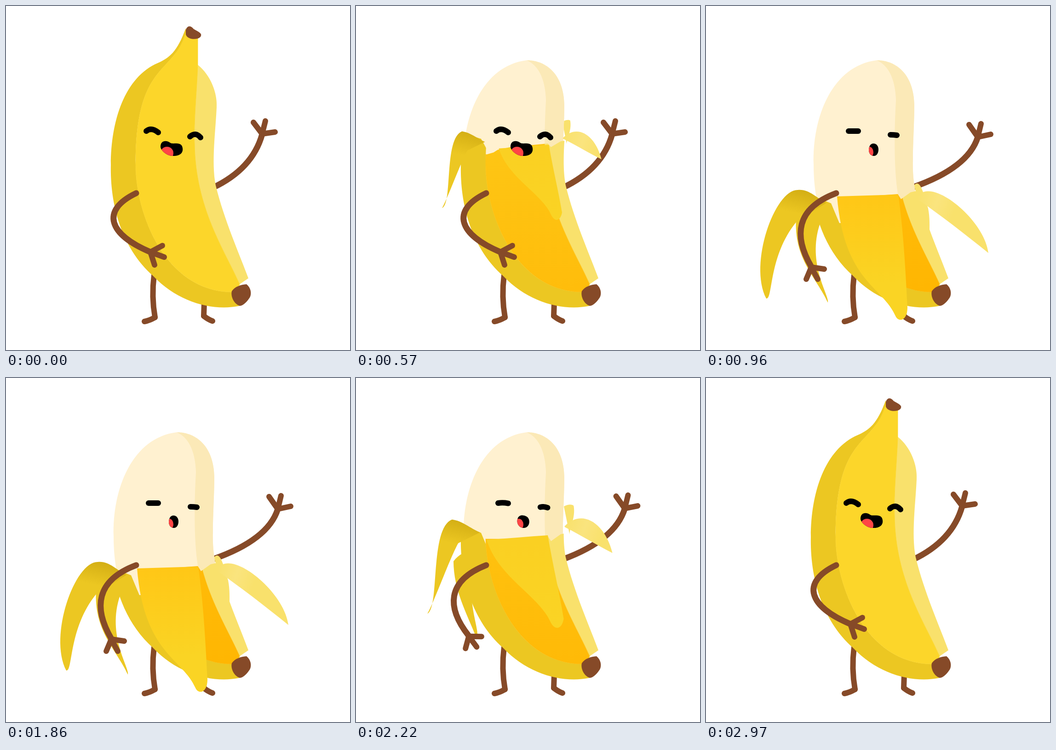
Animation, 748 px wide and 748 px high, one loop 3 s. Source, as an HTML page with a canvas:

```html
<!DOCTYPE html>
<html lang="en">
<head>
<meta charset="utf-8">
<title>Peeling banana</title>
<style>
html, body { margin: 0; width: 100%; height: 100%; overflow: hidden; background: #fff; }
canvas { display: block; width: 748px; height: 748px; }
</style>
</head>
<body>
<canvas id="stage" width="748" height="748"></canvas>
<script>
const ctx = document.getElementById('stage').getContext('2d');
const SIZE = 748, LOOP = 3000;
const BROWN = '#864a28', DARK = '#ecc722', LIGHT = '#f9e16c';

// Peel level = height of the front fold
const CLOSED = 50, CUT = 160, HALF = 345, OPEN = 412;

// Curves: a start point, then cubic segments
const leftEdge = [391,48, 372,100, 355,113, 330,124, 258,155, 228,250, 228,345,
  226,430, 250,525, 320,587, 375,645, 450,664, 508,652];
const leftSeam = [491,622, 345,620, 282,450, 282,345, 282,120, 365,150, 391,58];
const rightSeam = [417,128, 415,185, 408,250, 410,300, 412,440, 475,530, 508,605];
const rightEdge = [417,128, 445,150, 460,190, 458,220, 456,270, 446,340, 456,390,
  474,465, 510,545, 527,592];
const flesh = [371,118, 275,130, 231,240, 234,345, 234,375, 237,400, 240,417,
  260,520, 440,480, 457,412, 451,385, 449,360, 450,330, 450,300, 453,250, 453,215,
  452,150, 415,118, 371,118];
const fleshShade = [371,118, 400,130, 412,165, 413,205, 408,290, 410,370, 418,412];
const tipCap = [491,620, 498,610, 510,606, 523,605, 532,612, 535,625, 530,634,
  522,646, 514,652, 508,652, 496,648, 488,632, 491,620];
const stemCap = [391,52, 394,42, 402,42, 408,50, 422,58, 427,60, 423,67, 415,75, 394,73, 391,62];
const stem = {
  from: [350,132, 375,100, 382,70, 391,52, 400,52, 408,55, 417,62, 417,85, 417,105, 417,128],
  to: [370,121, 385,112, 392,100, 408,96, 413,94, 419,91, 425,91, 420,100, 417,115, 417,131]
};

// Flaps grow out of a pivot up to the half pose, then swing to the open one.
const outerFlap = {
  pivot: [328,125], swing: 1,
  half: [270,333, 248,324, 232,308, 209,305, 160,325, 185,497, 156,509, 172,480, 204,392, 223,356],
  open: [262,428, 240,418, 225,398, 200,400, 150,398, 92,560, 131,636, 146,640, 135,545, 196,470]
};
const innerFlap = {
  pivot: [328,125], swing: 0.25,
  half: [262,340, 245,340, 235,345, 223,356, 228,400, 240,455, 260,510, 274,506, 260,450, 258,420],
  open: [262,432, 240,425, 215,430, 196,460, 190,550, 240,590, 265,645, 270,632, 218,560, 248,473]
};
const frontFlap = {
  pivot: [430,128], swing: 1,
  half: [284,350, 328,347, 373,343, 417,340, 428,405, 442,460, 452,520,
    448,542, 434,546, 424,528, 400,470, 310,430, 284,350],
  open: [285,414, 330,413, 374,411, 418,410, 430,495, 434,580, 438,655,
    438,686, 418,688, 412,674, 385,610, 300,600, 285,414]
};
const rightFlap = {
  pivot: [433,140], swing: 1,
  half: [453,320, 492,280, 540,312, 556,376, 520,358, 487,338, 455,322],
  open: [460,416, 485,368, 605,462, 614,537, 562,495, 510,455, 460,420]
};
const rightBack = {
  pivot: [433,140], swing: 1,
  half: [452,276, 460,272, 468,270, 473,273, 478,300, 462,325, 464,337],
  open: [452,390, 466,375, 472,405, 483,440, 487,460, 486,480, 486,494]
};

// Limbs and face: [at rest, fully open]
const rightArm = [[450,395, 536,354, 557,279], [450,394, 570,352, 591,285]];
const rightHand = [[557,278, 538,253, 564,250, 585,274], [591,285, 572,258, 598,256, 619,279]];
const leftArm = [[283,407, 204,445, 224,497, 314,535], [283,407, 195,440, 190,500, 229,567]];
const leftHand = [[314,535, 340,521, 344,546, 323,563], [229,568, 257,572, 243,594, 218,594]];
const leftEye = [[305,272, 316,263, 331,275], [310,272, 320,272, 331,272]];
const rightEye = [[400,284, 412,273, 423,286], [401,280, 408,280, 415,281]];
const mouth = [
  [336,306, 336,292, 349,291, 358,298, 364,301, 382,294, 384,309,
    386,322, 374,327, 362,326, 350,326, 336,314, 336,306],
  [354,313, 354,305, 358,299, 364,299, 371,299, 375,305, 375,312,
    375,320, 371,326, 365,326, 358,326, 354,320, 354,313]];
const tongue = [[350,320, 14,14], [355,318, 9,12]];

const clamp = x => Math.max(0, Math.min(1, x));
const ramp = (x, a, b) => clamp((x - a) / (b - a));
const mix = (a, b, k) => a.map((v, i) => v + (b[i] - v) * k);
const smooth = x => x * x * (3 - 2 * x);
const pulse = (t, mid, reach) => Math.cos(Math.PI / 2 * Math.min(1, Math.abs(t - mid) / reach)) ** 2;
const rgb = c => `rgb(${c.map(Math.round)})`;
const reversed = p => p.map((_, i) => p[p.length - 2 - i + 2 * (i % 2)]);

function curve(p, join) {
  if (join) ctx.lineTo(p[0], p[1]); else ctx.moveTo(p[0], p[1]);
  for (let i = 2; i < p.length; i += 6) ctx.bezierCurveTo(...p.slice(i, i + 6));
}
// One closed outline of several curves, joined by straight lines
function trace(...curves) {
  ctx.beginPath();
  curves.forEach((p, i) => curve(p, i > 0));
  ctx.closePath();
}
function fill(color, ...curves) {
  trace(...curves);
  ctx.fillStyle = color;
  ctx.fill();
}
function clipped(curves, draw) {
  ctx.save();
  trace(...curves);
  ctx.clip();
  draw();
  ctx.restore();
}
function shifted(dy, draw) {
  ctx.save();
  ctx.translate(0, dy);
  draw();
  ctx.restore();
}
// The part of the stage below a line of points
function below(points) {
  const first = points[0], last = points[points.length - 1];
  return [[0, first[1]], ...points, [SIZE, last[1]], [SIZE, SIZE], [0, SIZE]];
}
function fade(x0, y0, x1, y1, ...colors) {
  const g = ctx.createLinearGradient(x0, y0, x1, y1);
  colors.forEach((c, i) => g.addColorStop(i / (colors.length - 1), c));
  return g;
}
function line(p, width, color = BROWN) {
  ctx.beginPath();
  ctx.moveTo(p[0], p[1]);
  if (p.length === 4) ctx.lineTo(p[2], p[3]);
  else if (p.length === 6) ctx.quadraticCurveTo(...p.slice(2));
  else ctx.bezierCurveTo(...p.slice(2));
  ctx.lineWidth = width;
  ctx.strokeStyle = color;
  ctx.stroke();
}
function limb(arm, hand, k) {
  line(mix(...arm, k), 13);
  const [x, y, ...tips] = mix(...hand, k);
  for (let i = 0; i < 6; i += 2) line([x, y, tips[i], tips[i + 1]], 12);
}
function legs() {
  line([322,585, 316,632, 324,677], 12);
  line([324,677, 312,684, 301,686], 12);
  line([431,645, 430,674], 12);
  line([430,674, 440,682, 449,685], 12);
}
function face(k) {
  line(mix(...leftEye, k), 12, '#000');
  line(mix(...rightEye, k), 12, '#000');
  const lips = mix(...mouth, k);
  fill('#000', lips);
  clipped([lips], () => {
    ctx.beginPath();
    ctx.ellipse(...mix(...tongue, k), 0, 0, Math.PI * 2);
    ctx.fillStyle = '#ff4545';
    ctx.fill();
  });
}

function flapShape(flap, h) {
  const grow = ramp(h, CUT - 10, HALF) ** 0.8;
  const pose = mix(flap.half, flap.open, ramp(h, HALF, OPEN) ** flap.swing);
  return pose.map((v, i) => flap.pivot[i % 2] + (v - flap.pivot[i % 2]) * grow);
}
function leftFold(h) {
  const s = ramp(h, CUT, HALF);
  const y = 40 + 99 * ramp(h, CLOSED, CUT) + 166 * s + 95 * ramp(h, HALF, OPEN);
  return below([[200, y], [272, y + 29 * s], [290, y + 72 * s]]);
}
function frontFold(h) {
  const s = ramp(h, CUT, HALF), dip = ramp(h, CLOSED, CUT) - s, y = h + 3;
  return below([[285, y + 75 * dip], [299, y + 58 * dip], [308, y + 34 * dip], [335, y + 9 * dip],
    [417, y - 6], [424, y + 5 * s - 9 * dip], [445, y - 10 * s - 13 * dip], [500, y - 22 * s - 13 * dip]]);
}

function drawBody(h) {
  clipped(leftFold(h), () => fill(DARK, leftEdge, leftSeam));
  const cut = ramp(h, CLOSED, CUT), peel = ramp(h, CUT, OPEN);
  const top = mix(mix([252,214,42], [250,212,36], cut), [255,194,16], peel);
  const bottom = mix(mix([252,214,42], [255,199,22], cut), [255,182,2], peel);
  clipped(frontFold(h), () => {
    fill(LIGHT, rightEdge, reversed(rightSeam));
    fill(fade(0, 150, 0, 620, rgb(top), rgb(bottom)), leftSeam, [417, 62], rightSeam, [500, 622]);
    ctx.strokeStyle = ctx.fillStyle;
    ctx.lineWidth = 0.8;
    ctx.stroke();
  });
  fill(BROWN, tipCap);
}
function drawFlaps(h) {
  fill(DARK, flapShape(innerFlap, h));
  const outer = flapShape(outerFlap, h), [x, y] = outer.slice(6);
  fill(fade(x + 14, y, x + 2, y + 52, '#d3ae14', DARK), outer);
  const front = flapShape(frontFlap, h);
  const inside = mix([250,208,34], [255,199,22], ramp(h, HALF, OPEN));
  fill(fade(0, front[1], 0, front[1] + 190, rgb(inside), '#fad424'), front);
  const right = flapShape(rightFlap, h);
  fill(fade(right[0], right[1], right[0] + 80, right[1] + 30, LIGHT, '#fae47e', LIGHT), right);
}

// The closing half replays the peel backwards.
function peelLevel(t) {
  const u = Math.max(0, t < LOOP / 2 ? t : 2848 - t);
  return CLOSED + (OPEN - CLOSED) * (1 - Math.exp(-((u / 546) ** 3.9)));
}

function draw(t) {
  const h = peelLevel(t);
  const k = smooth(ramp(t, 690, 960)) - smooth(ramp(t, 2120, 2480));
  const peeled = h > CUT - 10;
  const sink = Math.max(0, h - CUT) * 2.1;
  const cap = () => shifted(18 * ramp(h, CLOSED, CUT) + sink, () => fill(BROWN, stemCap));

  ctx.fillStyle = '#fff';
  ctx.fillRect(0, 0, SIZE, SIZE);
  ctx.lineCap = ctx.lineJoin = 'round';

  limb(rightArm, rightHand, k);
  legs();
  if (peeled) fill(LIGHT, flapShape(rightBack, h));
  if (sink < 80) {
    if (sink) cap();
    shifted(sink, () => fill('#fcd62a', mix(stem.from, stem.to, ramp(h, CLOSED, CUT))));
  }
  fill('#fff1d0', flesh);
  clipped([flesh], () => fill('#fbe9b7', fleshShade, [430, 470], [500, 470], [500, 100]));
  drawBody(h);
  if (peeled) drawFlaps(h);
  if (!sink) cap();

  shifted(-4 * (pulse(t, 420, 130) + pulse(t, 2840, 140)), () => face(k));
  limb(leftArm, leftHand, k);
}

function tick() {
  draw(performance.now() % LOOP);
  requestAnimationFrame(tick);
}
tick();
</script>
</body>
</html>
```
